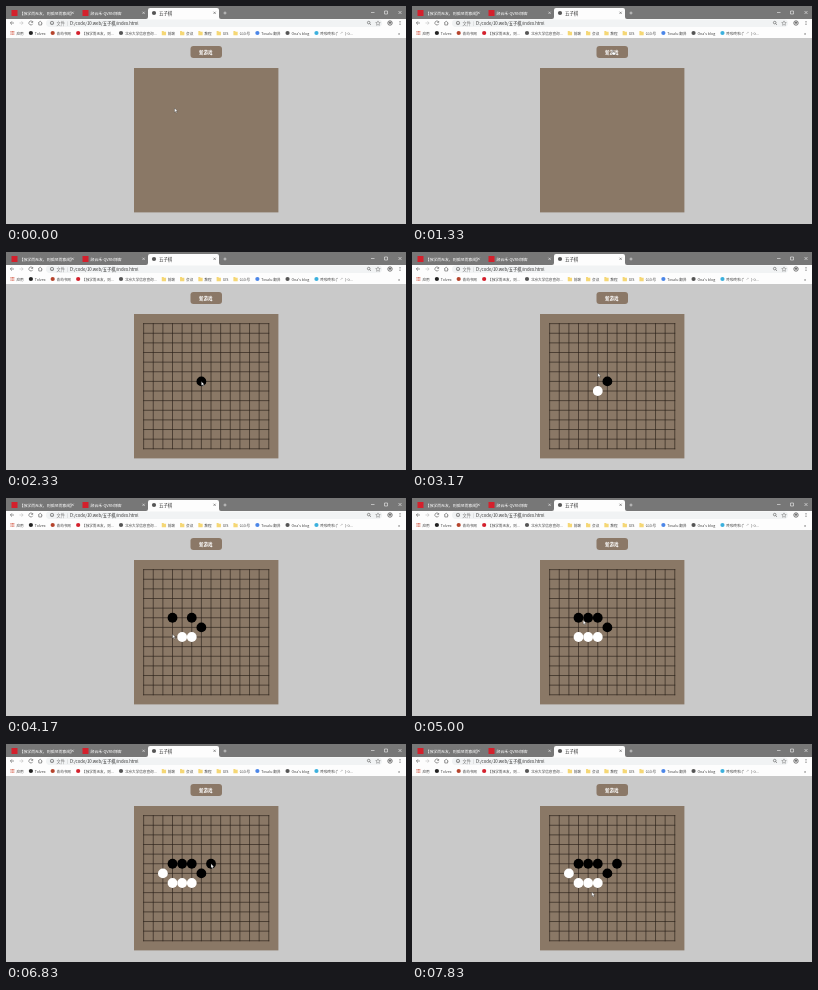
These frames come from a looping animation (400 px wide and 218 px high, 8 s). An HTML page:

```html
<!DOCTYPE html>
<html lang="zh-CN">
<head>
<meta charset="utf-8">
<style>
html, body { margin: 0; height: 100%; overflow: hidden; background: #c9c9c9; }
svg { display: block; width: 100vw; height: 100vh; }
text { font-family: "Noto Sans CJK SC", "Noto Sans CJK", "Open Sans", sans-serif; dominant-baseline: central; }
</style>
</head>
<body>
<svg viewBox="0 0 400 218">
  <rect width="400" height="218" fill="#c9c9c9"/>
  <rect width="400" height="13" fill="#777"/>
  <rect y="13" width="400" height="19" fill="#fdfdfd"/>
  <path d="M140 13q2 0 2-2V4q0-2 2-2h67q2 0 2 2v7q0 2 2 2z" fill="#fdfdfd"/>
  <rect x="40" y="13.5" width="336" height="7.5" rx="3.7" fill="#f1f3f4"/>

  <g fill="none" stroke-width=".6">
    <path d="M217.500 7h3m-1.500-1.500v3M365 6.500h3.500M378.500 5h3v3h-3zM392.500 5l3 3m0-3l-3 3" stroke="#eee"/>
    <path d="M13.500 17h3.500m-1.500-1.700l1.700 1.700-1.700 1.700" stroke="#bbb"/>
    <g stroke="#555">
      <path d="M8 17H4.500m1.500-1.700L4.300 17 6 18.700"/>
      <path d="M26.500 15.800a2 2 0 1 0 .2 2m0-2.800v1.400h-1.500"/>
      <path d="M32 17.200l2.200-2 2.200 2m-3.600-.5V19h2.800v-2.300"/>
      <circle cx="46" cy="17" r="1.700"/><path d="M46 16.700v1.200"/>
      <circle cx="362.700" cy="16.600" r="1.300"/><path d="M363.700 17.600l1.300 1.300"/>
      <path d="M372 14.900l.7 1.500 1.600.2-1.200 1.100.3 1.600-1.400-.8-1.400.8.3-1.600-1.200-1.100 1.600-.2z" stroke-width=".4"/>
      <circle cx="384" cy="17" r="2.200" stroke-width=".8"/><circle cx="384" cy="16.700" r=".8" fill="#555"/>
      <path d="M394 15v4" stroke-width=".9" stroke-dasharray=".8"/>
    </g>
  </g>
  <g id="bar"></g>

  <rect x="184.500" y="40" width="31.500" height="12" rx="3" fill="#8b7867"/>
  <text x="199.800" y="46" font-size="4.500" font-weight="700" fill="#fff" text-anchor="middle">新游戏</text>

  <rect id="board" fill="#8a7866"/>
  <g id="game">
    <path id="grid" stroke="#2a2119" stroke-width=".65" fill="none" stroke-linecap="square"/>
  </g>

  <path id="arrow" d="M0 0v4.200l1-.8.7 1.500.7-.3-.6-1.500H3z" fill="#fff" stroke="#222" stroke-width=".3"/>
  <path id="hand" d="M.3 0q.6-.3.8.3V2l2 .5q.6.2.5.9L3.200 5H.9L-.7 3q0-.7 1 0z" fill="#fff" stroke="#333" stroke-width=".3"/>
</svg>
<script>
const $ = id => document.getElementById(id);

function set(el, attrs) {
  for (const key in attrs) el.setAttribute(key, attrs[key]);
  return el;
}

function add(parent, tag, attrs, content = '') {
  const el = set(document.createElementNS('http://www.w3.org/2000/svg', tag), attrs);
  el.textContent = content;
  parent.append(el);
  return el;
}

const bar = $('bar');
const label = (x, y, text, fill = '#444', size = 3.9) =>
  add(bar, 'text', { x, y, fill, 'font-size': size }, text);
const dot = (cx, cy, fill) => add(bar, 'circle', { cx, cy, r: 2.1, fill });
const square = (x, y, fill, size) => add(bar, 'rect', { x, y, width: size, height: size, fill });

// Tabs, 71 px apart
['【独学而无友，则孤陋而寡闻】', '顾云禾-QVRN博客', '五子棋'].forEach((title, i) => {
  const x = 71 * i, active = i === 2;
  if (active) dot(x + 6, 7, '#555');
  else square(x + 5.5, 4, '#d4202c', 6);
  label(x + (active ? 11 : 13.5), 7, title, active ? '#333' : '#fff', active ? 4.4 : 3.9);
  add(bar, 'path', { d: `M${x + 65.500} 5.700l2.200 2.200m0-2.200l-2.200 2.200`,
    stroke: active ? '#555' : '#eee', 'stroke-width': .6 });
});
label(50.5, 17, '文件', '#777', 4.2);
label(61, 16.8, '|', '#aaa', 4.2);
label(64, 17, 'D:/code/10.web/五子棋/index.html', '#333', 4.25);

// Bookmarks flow from the left; those without a colour are folders
let x = 4.5;
for (const [title, color] of [
  ['应用', 'apps'], ['Tolvex', '#222'], ['青屿书网', '#b5442c'],
  ['【独学而无友，则...', '#d4202c'], ['北京大学信息查询...', '#555'],
  ['前端'], ['会议'], ['教程'], ['GIS'], ['公众号'],
  ['Tovalu 翻译', '#4b86e8'], ["Ona's blog", '#555'], ['咚啦咚啦 (゜-゜)つ...', '#3bb0dd']
]) {
  if (!color) add(bar, 'path', { d: `M${x} 25h1.700l.6.700h2v3.600H${x}z`, fill: '#f5d775' });
  else if (color !== 'apps') dot(x + 2.1, 27, color);
  else for (let i = 0; i < 9; i++) square(x + i % 3 * 1.4, 25 + Math.floor(i / 3) * 1.4, '#d8705f', 1);
  x += 11.1 + label(x + 6, 27.1, title, '#444', 3.6).getComputedTextLength();
}
label(392, 26.8, '»', '#333', 4.5);

// Board: 15 by 15 cells, lines start one cell in
const size = 144.4, cell = size / 15, boardX = 128, boardY = 62;
const at = (col, row) => [boardX + (col + 1) * cell, boardY + (row + 1) * cell];
set($('board'), { x: boardX, y: boardY, width: size, height: size });
let lines = '';
for (let i = 0; i < 14; i++)
  lines += `M${at(0, i)}h${13 * cell}M${at(i, 0)}v${13 * cell}`;
set($('grid'), { d: lines });

// Moves: tick, column, row; black starts
const moves = [
  [14, 6, 6], [16, 5, 7], [20, 5, 5], [22, 4, 7], [23, 3, 5],
  [26, 3, 7], [28, 4, 5], [33, 2, 6], [41, 7, 5]
];
const stones = moves.map(([, col, row], i) => {
  const [cx, cy] = at(col, row);
  return add($('game'), 'circle', { cx, cy, r: 4.9, fill: i % 2 ? '#fff' : '#000' });
});

// The pointer visits the button, then every move
const stops = [
  [3, 168.5, 102], [8, 200, 44],
  ...moves.map(([tick, col, row]) => [tick, ...at(col, row)]),
  [47, 179.8, 148]
];
const ease = k => k < .5 ? 4 * k ** 3 : 1 - 4 * (1 - k) ** 3;

function pointer(tick) {
  const i = Math.max(1, stops.findIndex(stop => stop[0] >= tick));
  const [t0, x0, y0] = stops[i - 1], [t1, x1, y1] = stops[i];
  const k = ease(Math.max(0, (tick - t0) / (t1 - t0)));
  return [x0 + (x1 - x0) * k, y0 + (y1 - y0) * k];
}

const show = (el, on) => el.style.display = on ? '' : 'none';

function draw(ms) {
  // The screen is refreshed six times a second
  const tick = Math.min(47, Math.floor((ms % 8000 + 5) * 6 / 1000));
  const [px, py] = pointer(tick);
  const onButton = px > 184 && px < 216 && py > 40 && py < 52;
  show($('game'), tick >= 9);
  stones.forEach((stone, i) => show(stone, tick >= moves[i][0]));
  show($('arrow'), !onButton);
  show($('hand'), onButton);
  for (const id of ['arrow', 'hand']) set($(id), { transform: `translate(${px} ${py})` });
}

const start = performance.now();
function loop() {
  draw(performance.now() - start);
  requestAnimationFrame(loop);
}
loop();
</script>
</body>
</html>
```
